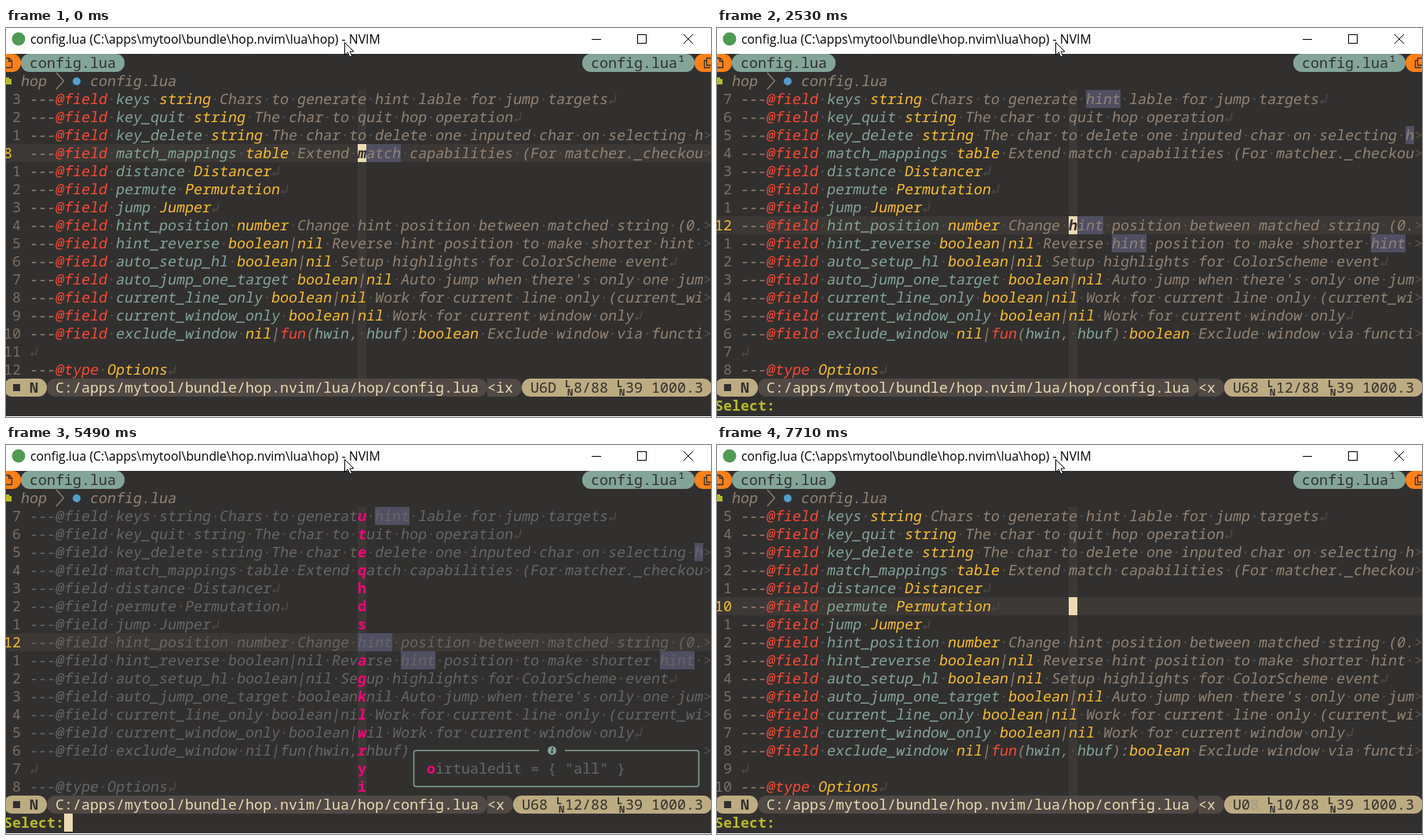
These frames come from a looping animation (898x496 px, 7.74 s). An HTML page with a canvas:

```html
<!DOCTYPE html>
<html lang="en">
<head>
<meta charset="utf-8">
<title>Vertical hop in an editor</title>
<style>
  html, body { margin: 0; width: 100%; height: 100%; overflow: hidden; background: #32302f; }
  canvas { display: block; }
</style>
</head>
<body>
<canvas id="stage" width="898" height="496"></canvas>
<script>
const ctx = document.getElementById('stage').getContext('2d');
const LOOP = 7740, CELL = 11, ROW = 23, TEXT_X = 30, TEXT_Y = 79, COLS = 78, CURSOR_COL = 38;
const SLANT = 0.17;
const MONO = '18.333px "Noto Sans Mono", "DejaVu Sans Mono", monospace';
const C = {
  bg: '#32302f', line: '#3c3836', panel: '#504945', space: '#5c544e', number: '#7c6f64',
  comment: '#928374', cream: '#ebdbb2', tan: '#bdab82', teal: '#83a598', yellow: '#fabd2f',
  red: '#fb4934', orange: '#fe8019', green: '#b8bb26', word: '#504f62', dim: '#666666', label: '#ff007c'
};
const PATH = ['apps', 'mytool', 'bundle', 'hop.nvim', 'lua', 'hop'];

const fields = [
  ['keys', 'string', 'Chars to generate hint lable for jump targets'],
  ['key_quit', 'string', 'The char to quit hop operation'],
  ['key_delete', 'string', 'The char to delete one inputed char on selecting hint'],
  ['match_mappings', 'table', 'Extend match capabilities (For matcher._checkout)'],
  ['distance', 'Distancer'],
  ['permute', 'Permutation'],
  ['jump', 'Jumper'],
  ['hint_position', 'number', 'Change hint position between matched string (0.5)'],
  ['hint_reverse', 'boolean|nil', 'Reverse hint position to make shorter hint first'],
  ['auto_setup_hl', 'boolean|nil', 'Setup highlights for ColorScheme event'],
  ['auto_jump_one_target', 'boolean|nil', "Auto jump when there's only one jump"],
  ['current_line_only', 'boolean|nil', 'Work for current line only (current_window)'],
  ['current_window_only', 'boolean|nil', 'Work for current window only'],
  ['exclude_window', 'nil|fun(hwin, hbuf):boolean', 'Exclude window via function']
];

function typeColor(part) {
  if (part === 'fun') return C.red;
  if (/^h(win|buf)$/.test(part)) return C.teal;
  return /\w/.test(part) ? C.yellow : C.comment;
}

// A line is a list of [character, color] cells.
function buildLine(tag, name, type, note) {
  const cells = [];
  const add = (text, color) => { for (const ch of text) cells.push([ch, color]); };
  add('---', C.comment);
  add(tag + ' ', C.red);
  if (name) add(name + ' ', C.teal);
  for (const part of type.match(/\w+|\W+/g)) add(part, typeColor(part));
  if (note) add(' ' + note, C.comment);
  return cells;
}
const lines = [...fields.map(f => buildLine('@field', ...f)), [], buildLine('@type', '', 'Options')];

const within = (t, ...spans) => spans.some(([from, to]) => t >= from && t < to);

function stateAt(t) {
  const stage = t < 2530 ? 0 : t < 6590 ? 1 : 2;
  return {
    row: [3, 7, 5][stage],
    lineNo: ['8', '12', '10'][stage],
    code: ['U6D', 'U68', 'U0'][stage],
    word: [/\bmatch\b/g, /\bhint\b/g, null][stage],
    labels: ['hda sgklqwertyui', 'uteqhds agklwryi', ''][stage],
    pastEnd: stage === 1,
    hop: within(t, [1500, 2530], [5460, 6590]),
    command: within(t, [570, 1500], [4440, 5460]),
    typed: within(t, [960, 1500], [4840, 5460]),
    select: within(t, [1500, 4440], [5460, LOOP]),
    selectCursor: within(t, [1500, 2220], [5460, 6160]),
    popup: within(t, [3530, 6520]),
    keys: within(t, [3020, 3170]) ? '<20>' : within(t, [3170, 3460]) ? '<20>v' : '',
    cursor: within(t, [0, 210], [2530, 3200], [3630, 3880], [4280, 4440], [6590, 7300], [7710, LOOP])
  };
}

function rect(x, y, w, h, color) {
  ctx.fillStyle = color;
  ctx.fillRect(x, y, w, h);
}

function disc(x, y, r, color) {
  ctx.fillStyle = color;
  ctx.beginPath();
  ctx.arc(x, y, r, 0, 7);
  ctx.fill();
}

function pill(x0, x1, y, color, left = 11, right = 11) {
  ctx.fillStyle = color;
  ctx.beginPath();
  ctx.roundRect(x0, y, x1 - x0, ROW, [left, right, right, left]);
  ctx.fill();
}

function stroke(points, color, width = 1) {
  ctx.strokeStyle = color;
  ctx.lineWidth = width;
  ctx.beginPath();
  points.forEach(([x, y], i) => i ? ctx.lineTo(x, y) : ctx.moveTo(x, y));
  ctx.stroke();
}

// Text on the character grid; y is the top of its row.
function write(text, x, y, color, weight = '') {
  ctx.font = weight + ' ' + MONO;
  ctx.fillStyle = color;
  [...text].forEach((ch, i) => ctx.fillText(ch, x + i * CELL, y + 18));
}

// Gentle italic, leaning about the middle of the small letters.
function writeItalic(text, x, y, color, weight) {
  ctx.setTransform(1, 0, -SLANT, 1, SLANT * (y + 13), 0);
  write(text, x, y, color, weight);
  ctx.resetTransform();
}

function drawTitleBar() {
  rect(0, 0, 898, 33, '#fff');
  disc(16, 14, 8.5, '#4f9a54');
  ctx.font = '15.77px "Open Sans", "Noto Sans", sans-serif';
  ctx.fillStyle = '#000';
  ctx.fillText('config.lua (C:\\' + PATH.join('\\') + ') - NVIM', 31, 20);
  stroke([[746, 14.5], [758, 14.5]], '#000');
  ctx.strokeRect(804.5, 8.5, 11, 11);
  stroke([[863, 8], [875, 20]], '#000');
  stroke([[875, 8], [863, 20]], '#000');
}

function drawTabs() {
  pill(-3, 19, 33, C.orange, 0);
  stroke([[-1, 38.5], [4, 38.5], [7.5, 42], [7.5, 50.5], [-1, 50.5]], C.bg, 1.3);
  stroke([[3.5, 38.5], [3.5, 42.5], [7.5, 42.5]], C.bg, 1.3);
  pill(19, 151, 33, C.teal);
  write('config.lua', 30, 33, C.bg);
  pill(734, 877, 33, C.teal);
  write('config.lua¹', 745, 33, C.bg);
  pill(877, 905, 33, C.orange, 11, 0);
  stroke([[899, 38.5], [892.5, 38.5], [892.5, 47.5], [899, 47.5]], C.bg, 1.3);
  stroke([[892, 41.5], [889.5, 41.5], [889.5, 50.5], [897, 50.5]], C.bg, 1.3);

  rect(0, 63, 4, 9, C.green);
  rect(0, 65, 7, 7, C.green);
  writeItalic('hop', 19, 56, C.comment);
  stroke([[64, 57], [73.5, 67.5], [64, 78]], C.comment, 1.3);
  disc(90, 68, 5, '#51a0cf');
  writeItalic('config.lua', 107, 56, C.comment);
}

function drawLine(cells, index, s) {
  const y = TEXT_Y + index * ROW, current = index === s.row;
  const number = current ? s.lineNo : String(Math.abs(index - s.row)).padStart(2);
  if (current) rect(0, y, 898, ROW, C.line);
  rect(TEXT_X + CURSOR_COL * CELL, y, CELL, ROW, C.line);
  write(number, -3, y, current ? C.yellow : C.number);

  const visible = cells.slice(0, COLS);
  if (s.word && (s.pastEnd || current)) {
    for (const m of cells.map(c => c[0]).join('').matchAll(s.word)) {
      const end = Math.min(COLS, m.index + m[0].length);
      rect(TEXT_X + m.index * CELL, y, (end - m.index) * CELL, ROW, C.word);
    }
  }

  const label = s.hop ? (s.labels[index] || ' ').trim() : '';
  const labelCol = s.pastEnd ? CURSOR_COL : Math.max(0, Math.min(CURSOR_COL, cells.length - 1));
  const hidden = label ? labelCol : -1;
  visible.forEach(([ch, color], col) => {
    if (col === hidden) return;
    const x = TEXT_X + col * CELL;
    if (ch === ' ') write('·', x, y, C.space);
    else writeItalic(ch, x, y, s.hop ? C.dim : color);
  });
  const end = visible.length;
  if (cells.length > COLS) write('>', TEXT_X + COLS * CELL, y, C.space);
  else if (end !== hidden) writeItalic('↲', TEXT_X + end * CELL, y, C.panel);
  if (label) (labelCol < end ? writeItalic : write)(label, TEXT_X + labelCol * CELL, y, C.label, 'bold');

  if (current && s.cursor) {
    const x = TEXT_X + CURSOR_COL * CELL;
    rect(x, y, CELL, ROW, C.cream);
    if (cells[CURSOR_COL]) writeItalic(cells[CURSOR_COL][0], x, y, C.bg, 'bold');
  }
}

function drawPopup(s) {
  rect(514, 378, 374, 69, C.bg);
  ctx.strokeStyle = C.teal;
  ctx.lineWidth = 1.5;
  ctx.beginPath();
  ctx.roundRect(519.5, 389.5, 363, 46, 3);
  ctx.stroke();
  rect(679, 386, 33, 8, C.bg);
  disc(695.5, 389.5, 5.5, C.teal);
  rect(695, 386, 2, 2, C.bg);
  rect(694.5, 389, 2, 4, C.bg);
  const text = 'virtualedit = { "all" }';
  write(s.hop ? ' ' + text.slice(1) : text, 536, 401, s.hop ? C.dim : C.cream);
  if (s.hop) write('o', 536, 401, C.label, 'bold');
}

function lineMark(x, y) {
  ctx.font = 'bold 12px "Noto Sans Mono", monospace';
  ctx.fillStyle = C.bg;
  ctx.fillText('L', x, y + 11);
  ctx.fillText('N', x + 3, y + 22);
}

function drawStatus(s) {
  const y = 447, narrow = s.lineNo.length === 1, left = narrow ? 657 : 646;
  pill(-3, 52, y, C.tan);
  rect(9, 454, 9, 9, C.bg);
  write(s.command ? 'C' : 'N', 30, y, C.bg, 'bold');
  pill(52, 613, y, C.panel);
  write('C:/' + PATH.join('/') + '/config.lua', 63, y, C.cream);
  pill(613, left, y, C.panel, 0);
  write(narrow ? '<ix' : '<x', 613, y, C.cream);
  pill(left, 899, y, C.tan);
  write(s.code, left + 11, y, C.bg);
  if (s.code.length < 3) write('8', left + 33, y, '#a3997a');
  lineMark(left + 55, y);
  write(s.lineNo + '/88', left + 66, y, C.bg);
  lineMark(778, y);
  write('39', 789, y, C.bg);
  write('1000.3', 822, y, C.bg);
}

function drawCommandLine(s) {
  const y = 470;
  if (s.command) {
    const text = s.typed ? ':HopVertical' : ':';
    write(text, -3, y, C.cream);
    rect(-3 + text.length * CELL, y, CELL, ROW, C.cream);
  }
  if (s.select) write('Select:', -3, y, C.green, 'bold');
  if (s.selectCursor) rect(74, y, CELL, ROW, C.cream);
  write(s.keys, 778, y, C.cream);
}

function drawPointer() {
  ctx.beginPath();
  [[431.5, 18.5], [431.5, 34.5], [435.3, 31], [438, 37], [440.6, 35.8], [438, 30], [443, 30]]
    .forEach(p => ctx.lineTo(...p));
  ctx.closePath();
  ctx.fillStyle = '#fff';
  ctx.fill();
  ctx.strokeStyle = '#000';
  ctx.lineWidth = 1;
  ctx.stroke();
}

const start = performance.now();
function draw() {
  const s = stateAt((performance.now() - start) % LOOP);
  rect(0, 0, 898, 496, C.bg);
  drawTitleBar();
  drawTabs();
  lines.forEach((cells, i) => drawLine(cells, i, s));
  if (s.popup) drawPopup(s);
  drawStatus(s);
  drawCommandLine(s);
  rect(0, 495, 898, 1, '#fff');
  drawPointer();
  requestAnimationFrame(draw);
}
draw();
</script>
</body>
</html>
```
